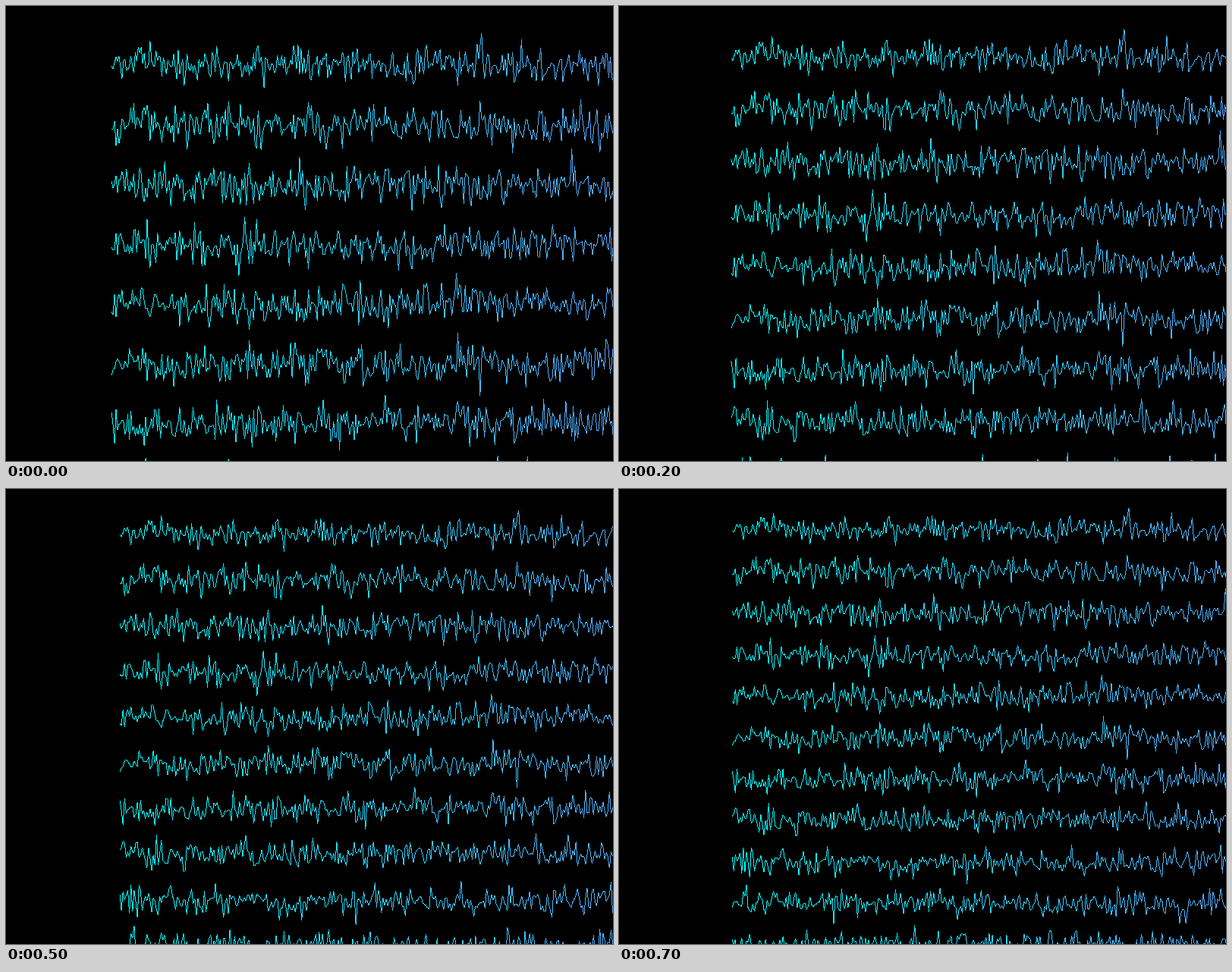
A matplotlib script for the animation above (800 ms loop, 800 px wide and 600 px high).

```python
import numpy as np
import matplotlib.pyplot as plt
from matplotlib.animation import FuncAnimation

WIDTH, HEIGHT, DPI = 800, 600, 100
FRAMES, INTERVAL = 8, 100
ROWS, SAMPLES = 12, 1000
PITCH, NOISE = 30, 5              # row distance and noise level before zooming
START_ANGLE, TURN = 0.9, 0.0945   # radians


def make_points():
    rng = np.random.default_rng(7)
    x = np.tile(np.linspace(50, 750, SAMPLES), (ROWS, 1))
    centres = PITCH * np.arange(1, ROWS + 1)[:, None]
    y = centres + rng.normal(scale=NOISE, size=(ROWS, SAMPLES))
    return np.stack([x, y], axis=-1)


def make_colors():
    t = np.linspace(0, 1, SAMPLES - 1)
    ramp = np.column_stack([t, 1 - t, np.ones_like(t)])
    return np.tile(np.round(255 * ramp).astype(np.uint8), (ROWS, 1))


def zoom(step):
    # The clock runs at double speed for the first two steps.
    angle = START_ANGLE + TURN * (step + min(step, 2))
    return 2 + np.array([np.sin(angle), np.cos(angle)])


def draw_lines(points):
    """Draw one-pixel hard-edged lines, one pixel per step of the longer axis."""
    start = points[:, :-1].reshape(-1, 2)
    delta = np.diff(points, axis=1).reshape(-1, 2)
    counts = np.ceil(np.abs(delta).max(axis=1)).astype(int)
    segment = np.repeat(np.arange(len(counts)), counts)
    first = np.cumsum(counts) - counts
    fraction = (np.arange(len(segment)) - first[segment] + 0.5) / counts[segment]
    pixels = np.floor(start[segment] + fraction[:, None] * delta[segment])
    col, row = pixels.astype(int).T
    inside = (col >= 0) & (col < WIDTH) & (row >= 0) & (row < HEIGHT)
    canvas = np.zeros((HEIGHT, WIDTH, 3), np.uint8)
    canvas[row[inside], col[inside]] = COLORS[segment[inside]]
    return canvas


POINTS, COLORS = make_points(), make_colors()

fig = plt.figure(figsize=(WIDTH / DPI, HEIGHT / DPI), dpi=DPI, facecolor="black")
ax = fig.add_axes([0, 0, 1, 1])
ax.axis("off")
picture = ax.imshow(draw_lines(POINTS * zoom(0)), aspect="auto",
                    interpolation="nearest")


def update(step):
    picture.set_data(draw_lines(POINTS * zoom(step)))
    return [picture]


anim = FuncAnimation(fig, update, frames=FRAMES, interval=INTERVAL,
                     repeat=True, repeat_delay=0, blit=False)
plt.show()
```
